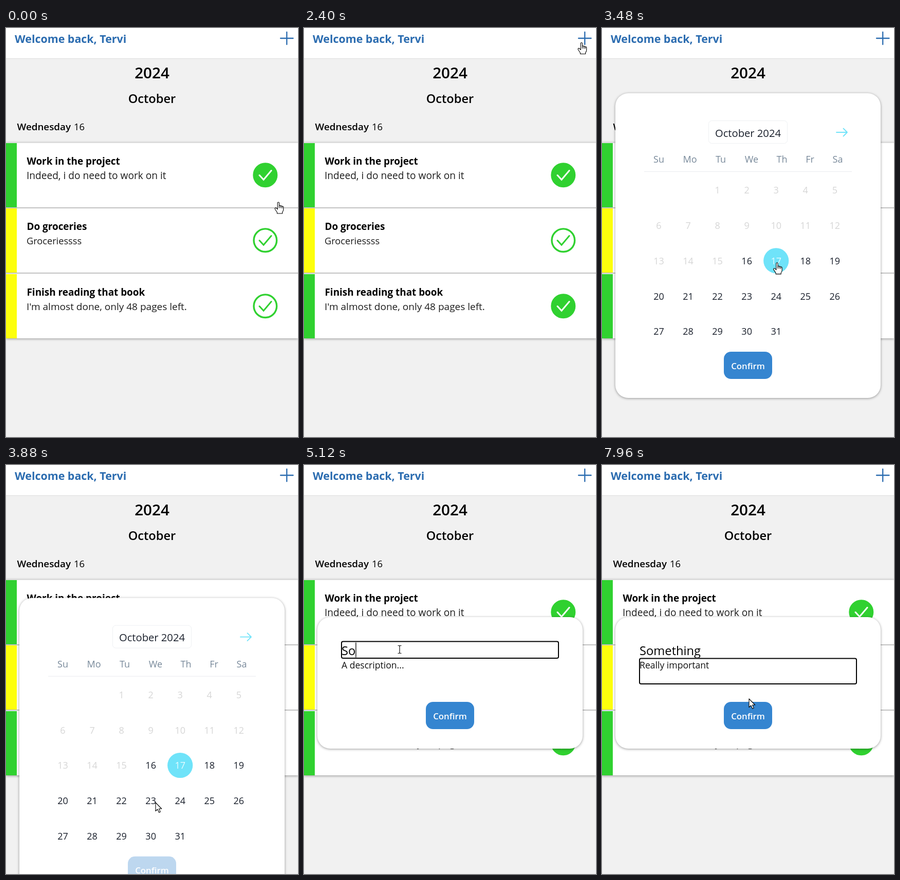
Write an HTML page that moves like this. It is 568x796 px and loops after 8000 ms.

```html
<!DOCTYPE html>
<html lang="en">
<head>
<meta charset="utf-8">
<title>Task planner</title>
<style>
  html, body { margin: 0; width: 100%; height: 100%; overflow: hidden; background: #f1f1f1; }
  svg { display: block; width: 568px; height: 796px; font-family: "Open Sans", "Noto Sans", sans-serif; }
  .shadow { filter: drop-shadow(0 1px 2.5px rgba(0, 0, 0, .4)); }
  .cursor { fill: #fff; stroke: #000; stroke-width: 1.1; stroke-linejoin: round; }
</style>
</head>
<body>
<svg id="stage" viewBox="0 0 568 796"></svg>
<script>
const GREEN = '#30d130', YELLOW = '#fdff0c', BLUE = '#2b6cb0', CYAN = '#6fe3f9', INK = '#1a202c';
const LOOP = 8000;
const CLICK = { task: 1560, plus: 2480, day: 3420, date: 3748, title: 4760, description: 6040 };

// ---------- markup helpers ----------
const text = (x, y, size, str, { weight = 400, fill = '#000', anchor = 'start', id = '' } = {}) =>
  `<text x="${x}" y="${y}" font-size="${size}" font-weight="${weight}" fill="${fill}" text-anchor="${anchor}" id="${id}">${str}</text>`;

const rect = (x, y, w, h, fill, extra = '') =>
  `<rect x="${x}" y="${y}" width="${w}" height="${h}" fill="${fill}" ${extra}/>`;

const line = (d, color, width) =>
  `<path d="${d}" fill="none" stroke="${color}" stroke-width="${width}" stroke-linecap="round" stroke-linejoin="round"/>`;

const confirmButton = (y, id) => `<g id="${id}">
  ${rect(237, y, 94, 53, '#3585d0', 'rx="14"')}
  ${text(284, y + 33.5, 16.8, 'Confirm', { weight: 600, fill: '#fff', anchor: 'middle' })}</g>`;

const dialog = (id, y, h, content) => `<g id="${id}">
  ${rect(26, y, 516, h, '#fff', 'rx="25" class="shadow"')}${content}</g>`;

const focusRing = (id, y, h) =>
  rect(73, y, 422, h, 'none', `rx="3" stroke="#000" stroke-width="2" id="${id}"`);

// ---------- task list ----------
function task(i, title, note, noteSize) {
  const top = 224 + Math.round(i * 127.4);
  return `<g transform="translate(0 ${top})">
    ${rect(0, 0, 568, 125, '#fff')}
    ${rect(0, 0, 21, 125, YELLOW, `id="bar${i}"`)}
    ${i < 2 ? rect(0, 125, 568, 2, '#c2c2c2') : ''}
    ${text(40.5, 42, 18.9, title, { weight: 700 })}
    ${text(40, 70, noteSize, note, { fill: '#1c1c1c' })}
    <circle id="ring${i}" cx="504.3" cy="62.2" r="22.3" stroke="${GREEN}" stroke-width="3.4"/>
    <path id="tick${i}" d="M493 62.5l8 8.8L516 53.5" fill="none" stroke-width="3" stroke-linecap="round"/>
  </g>`;
}

const page = `
  ${rect(0, 0, 568, 796, '#f1f1f1')}
  ${rect(0, 0, 568, 59, '#fff')}
  ${rect(0, 59, 568, 1, '#dcdcdc')}
  ${text(17, 29, 21.4, 'Welcome back, Tervi', { weight: 700, fill: BLUE })}
  ${line('M534 20H558.5M546.2 8V32', BLUE, 2.3)}
  ${text(284, 98, 29.6, '2024', { weight: 600, anchor: 'middle' })}
  ${text(284, 146, 23.6, 'October', { weight: 600, anchor: 'middle' })}
  ${text(21.5, 199, 18.8, 'Wednesday', { weight: 600 })}
  ${text(132, 199, 18.4, '16')}
  ${rect(0, 223, 568, 381, '#fff', 'class="shadow"')}
  ${rect(0, 223, 568, 1, '#e2e2e2')}
  ${task(0, 'Work in the project', 'Indeed, i do need to work on it', 19.1)}
  ${task(1, 'Do groceries', 'Groceriessss', 18.2)}
  ${task(2, 'Finish reading that book', "I'm almost done, only 48 pages left.", 19)}`;

// ---------- calendar ----------
const dayX = d => 110.5 + ((d + 1) % 7) * 57.05;
const dayY = d => 315.8 + Math.floor((d + 1) / 7) * 68.75;
const headerX = [110.5, 171, 231, 291, 350, 404.5, 458.5];
const weekdays = ['Su', 'Mo', 'Tu', 'We', 'Th', 'Fr', 'Sa']
  .map((name, i) => text(headerX[i], 262, 18, name, { fill: '#78899a', anchor: 'middle' })).join('');
const days = Array.from({ length: 31 }, (_, i) => i + 1)
  .map(d => text(dayX(d), dayY(d) + 6.5, 18, d,
    { fill: d < 16 ? '#d6d6d6' : INK, anchor: 'middle', id: 'day' + d })).join('');

const calendar = dialog('calendar', 127, 593, `
  ${rect(207.5, 180.5, 153, 44, '#fff', 'rx="6" stroke="#eef0f3"')}
  ${text(284, 211.5, 20.2, 'October 2024', { fill: INK, anchor: 'middle' })}
  ${line('M456 203H477M469.5 195.5L477 203L469.5 210.5', CYAN, 1.8)}
  ${weekdays}
  ${rect(82, 279, 404, 1, '#e9ebef')}
  <circle id="picked" r="24.6" fill="${CYAN}"/>
  ${days}
  ${confirmButton(630, 'dateConfirm')}`);

// ---------- form ----------
// The white strip cuts the title's descenders where the description box begins.
const form = dialog('form', 296, 256, `
  ${text(73, 370, 23.7, '', { id: 'title' })}
  ${rect(73, 375, 422, 51, '#fff')}
  ${text(73, 396, 17.6, '', { fill: '#111', id: 'description' })}
  ${focusRing('titleRing', 343.5, 32.5)}
  ${focusRing('descriptionRing', 376.5, 49.5)}
  ${rect(0, 0, 1.3, 1, '#000', 'id="caret"')}
  ${confirmButton(461, 'formConfirm')}`);

// Pointer shapes are drawn around their hot spot.
const cursors = `
  <path id="arrow" class="cursor" d="M0 0V16.5L3.8 13L6.6 19.3L9.3 18.1L6.6 12H11.7Z"/>
  <g id="hand" class="cursor">
    <path d="M-1.8 2C-1.8-.1 1.4-.1 1.4 2V8C1.4 6.4 4.3 6.6 4.3 8.3C4.5 7.2 7 7.3 7 9.1C7.4 8.2 9.6 8.4 9.6 10.3V15Q9.6 17.6 7.6 19.8V22.5H-2.6V20.3L-6.6 14.3C-8 12-5.5 10.4-3.8 12.3L-1.8 14.4Z"/>
    <path d="M1.4 8V12M4.3 8.5V12M7 9.2V12.5" fill="none"/>
  </g>
  <path id="beam" d="M-3.5-7.5H-1L0-6.5L1-7.5H3.5M0-6.5V6.5M-3.5 7.5H-1L0 6.5L1 7.5H3.5" fill="none" stroke="#111" stroke-width="1.2"/>`;

document.getElementById('stage').innerHTML = page + calendar + form + cursors;
const $ = id => document.getElementById(id);

// ---------- motion ----------
const clamp = v => Math.min(1, Math.max(0, v));
const progress = (t, start, duration) => clamp((t - start) / duration);
const easeOut = p => 1 - (1 - p) ** 3;
const smooth = p => p * p * (3 - 2 * p);

// time, x, y, pointer shape until the next stop
const path = [
  [40, 530, 338.5, 'hand'], [240, 527, 372, 'hand'], [680, 527, 372, 'hand'],
  [1240, 508, 540, 'hand'], [1660, 508, 540, 'hand'], [2300, 540, 28, 'hand'],
  [2500, 540, 28, 'arrow'], [2900, 394, 230, 'arrow'], [3000, 394, 230, 'arrow'],
  [3350, 341, 455, 'hand'], [3470, 341, 455, 'hand'], [3700, 291, 657, 'hand'],
  [3780, 291, 657, 'arrow'], [4200, 291, 657, 'arrow'], [4640, 186, 359, 'beam'],
  [5780, 186, 359, 'beam'], [5980, 211, 400, 'beam'], [7500, 211, 400, 'arrow'],
  [7900, 286, 455, 'arrow']
];

function moveCursor(t) {
  let i = path.length - 1;
  while (i > 0 && path[i][0] > t) i--;
  const [t0, x0, y0, kind] = path[i], [t1, x1, y1] = path[i + 1] || path[i];
  const p = t1 > t0 ? smooth(progress(t, t0, t1 - t0)) : 0;
  const x = x0 + (x1 - x0) * p, y = y0 + (y1 - y0) * p;
  const overGap = t < CLICK.plus && y > 36 && y < 224;
  const shape = overGap ? 'arrow' : kind;
  for (const id of ['arrow', 'hand', 'beam']) show(id, id === shape);
  $(shape).setAttribute('transform', `translate(${x} ${y})`);
}

function show(id, visible) { $(id).style.display = visible ? '' : 'none'; }

function slide(id, offset) {
  show(id, offset < 670);
  $(id).setAttribute('transform', `translate(0 ${offset})`);
}

function setTask(i, done) {
  $('bar' + i).setAttribute('fill', done ? GREEN : YELLOW);
  $('ring' + i).setAttribute('fill', done ? GREEN : '#fff');
  $('tick' + i).setAttribute('stroke', done ? '#fff' : GREEN);
}

function pickDay(day) {
  $('picked').setAttribute('cx', dayX(day));
  $('picked').setAttribute('cy', dayY(day) - .5);
  for (const d of [16, 17]) $('day' + d).setAttribute('fill', d === day ? '#e6fbff' : INK);
}

// Types a phrase at a steady pace; returns the time of the latest key press.
function type(id, phrase, placeholder, t, start, step) {
  const count = Math.min(phrase.length, Math.max(0, Math.floor((t - start) / step) + 1));
  $(id).textContent = count ? phrase.slice(0, count) : placeholder;
  return { count, last: start + (count - 1) * step };
}

function fillForm(t) {
  const title = type('title', 'Something', 'A title...', t, 4980, 90);
  const description = type('description', 'Really important', 'A description...', t, 6230, 80);
  const inDescription = t >= CLICK.description;
  const inTitle = t >= CLICK.title && !inDescription;
  show('titleRing', inTitle);
  show('descriptionRing', inDescription);

  const id = inDescription ? 'description' : 'title';
  const typed = inDescription ? description : title;
  const since = t - (typed.count ? typed.last : CLICK[id]);
  show('caret', (inTitle || inDescription) && since % 1000 < 500);
  $('caret').setAttribute('x', 73 + (typed.count ? $(id).getComputedTextLength() : 0));
  $('caret').setAttribute('y', inDescription ? 379 : 345.5);
  $('caret').setAttribute('height', inDescription ? 22 : 29);
}

function render(t) {
  setTask(0, true);
  setTask(1, false);
  setTask(2, t >= CLICK.task);
  pickDay(t < CLICK.day ? 16 : 17);

  const enter = 1 - easeOut(progress(t, CLICK.plus, 360));
  const leave = progress(t, CLICK.date, 300) ** 2;
  slide('calendar', 670 * Math.max(enter, leave));
  $('dateConfirm').setAttribute('opacity', t < CLICK.date ? 1 : .32);

  slide('form', 670 * (1 - easeOut(progress(t, 4080, 400))));
  fillForm(t);
  moveCursor(t);
}

function tick() {
  render(performance.now() % LOOP);
  requestAnimationFrame(tick);
}
tick();
</script>
</body>
</html>
```
